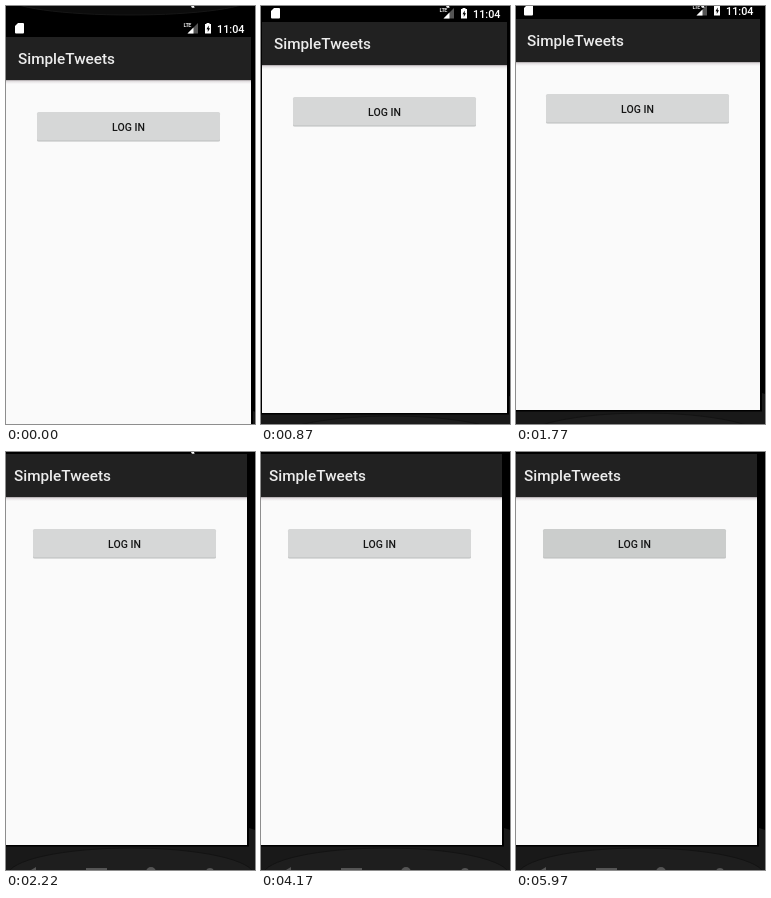
An HTML page for the animation above (8000 ms loop, 249 by 418 pixels).

```html
<!DOCTYPE html>
<html lang="en">
<head>
<meta charset="utf-8">
<title>Login screen</title>
<style>
  html, body { margin: 0; width: 100%; height: 100%; overflow: hidden; background: #000; }
  svg { display: block; width: 249px; height: 418px; }
  text { font-family: Roboto, sans-serif; font-weight: 500; }
</style>
</head>
<body>
<svg viewBox="0 0 249 418">
  <defs>
    <linearGradient id="shade" x2="0" y2="1">
      <stop stop-color="#a8a2a5"/>
      <stop offset=".4" stop-color="#e6e3e5"/>
      <stop offset="1" stop-color="#fafafa"/>
    </linearGradient>
  </defs>
  <rect width="249" height="418"/>

  <g id="phone">
    <ellipse cx="124" cy="-8" rx="122" ry="17" fill="#0c0c0c" stroke="#161616"/>

    <!-- status bar -->
    <g fill="#fff">
      <path d="M12 17h5q1 0 1 1v8.500q0 1-1 1h-7q-1 0-1-1v-6.500z"/>
      <text x="177.500" y="20.800" font-size="5.500" letter-spacing="-.5">LTE</text>
      <path d="M192 17v10.500h-10.500z" fill="#555"/>
      <path d="M187.500 21.500v6h-6z"/>
      <path d="M200.500 17h3v1h1.500v9.500h-6v-9.500h1.500z"/>
      <path d="M202.700 19.500l-2.200 3.700h1.300v2.800l2.200-3.700h-1.300z" fill="#000"/>
      <text x="211" y="26.500" font-size="10.800">11:04</text>
    </g>

    <!-- app -->
    <rect y="31" width="245" height="391" fill="#fafafa"/>
    <rect y="74" width="245" height="4" fill="url(#shade)"/>
    <rect y="31" width="245" height="43" fill="#212121"/>
    <text x="12" y="58.300" font-size="15.300" fill="#ececec">SimpleTweets</text>
    <rect x="31" y="107" width="183" height="28.500" rx="1.500" fill="#bcbdbd"/>
    <rect id="button" x="31" y="106" width="183" height="28.500" rx="1.500"/>
    <path id="ripple" d="M46 107H214V134H46Q44.500 120 46 107Z" fill="#ababab"/>
    <text x="122.500" y="124.800" font-size="10.500" text-anchor="middle" fill="#151515">LOG IN</text>

    <!-- lower bezel -->
    <path d="M-6 423.500H247V405l9 3V464H-6Z" fill="#191919"/>
    <ellipse cx="129" cy="452" rx="123" ry="27" fill="#1e1e1e" stroke="#131313"/>
    <g fill="#555">
      <path d="M29 447l5-3v3z"/>
      <rect x="84" y="445" width="21" height="5"/>
      <circle cx="149" cy="449" r="5"/>
      <circle cx="208" cy="449" r="4"/>
    </g>
  </g>

  <path id="cursor" d="M.5 .5V16.500L4.200 13.200L7.300 19H8.700L6.500 12.400H11.500Z" stroke="#fff" stroke-width="1.300"/>
</svg>
<script>
  const LOOP = 8000;
  // Places the window is dragged through; it moves on to the next in jumps of `step` ms.
  const drag = [
    { at: 0, x: 0, y: 0, step: 570 },
    { at: 570, x: -3, y: -12, step: 150 },
    { at: 1170, x: 4, y: -19, step: 300 },
    { at: 1770, x: -1, y: -18, step: 450 },
    { at: 2220, x: -4, y: -29, step: LOOP }
  ];
  const [phone, cursor, button, ripple] =
    ['phone', 'cursor', 'button', 'ripple'].map(id => document.getElementById(id));

  const place = (el, x, y) => el.setAttribute('transform', `translate(${x} ${y})`);
  const show = (el, on) => el.setAttribute('visibility', on ? 'visible' : 'hidden');

  function movePhone(t) {
    const i = drag.findLastIndex(d => d.at <= t);
    const a = drag[i], b = drag[i + 1] ?? a;
    const p = Math.floor((t - a.at) / a.step) * a.step / (b.at - a.at || 1);
    const mix = key => Math.round(a[key] + (b[key] - a[key]) * p);
    place(phone, mix('x'), mix('y'));
  }

  function moveCursor(t) {
    const p = Math.floor((t - 3570) / 150) / 3;
    if (p < 0) place(cursor, 179, -18);
    else place(cursor, 174 - 45 * p, 93 - 95 * (1 - p) ** 2);
    show(cursor, t < 4170);
  }

  function draw() {
    const t = performance.now() % LOOP;
    const pressed = t >= 5670 && t < 5820;
    movePhone(t);
    moveCursor(t);
    show(ripple, pressed);
    button.setAttribute('fill', pressed ? '#c0c2c1' : t >= 5820 ? '#cbcdcc' : '#d6d7d7');
    requestAnimationFrame(draw);
  }
  draw();
</script>
</body>
</html>
```
